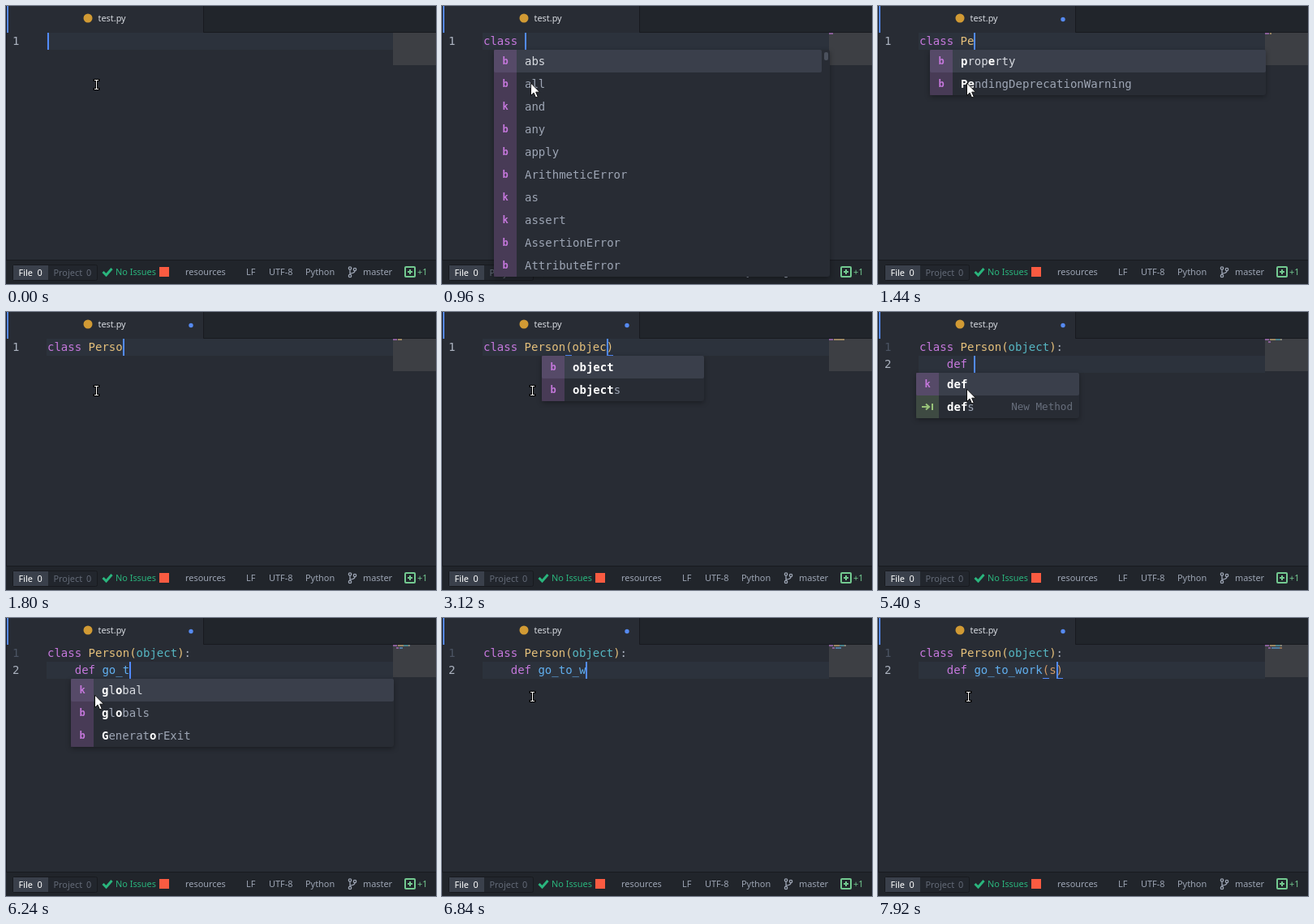
An HTML page that plays this animation: 530 by 343 pixels, repeating every 8 s.

```html
<!DOCTYPE html>
<html lang="en">
<head>
<meta charset="utf-8">
<title>Editor typing</title>
<style>
  html, body { margin: 0; width: 100%; height: 100%; overflow: hidden; background: #282c34; }
  svg { display: block; width: 530px; height: 343px; }
  text { white-space: pre; }
  .code { font: 14px "DejaVu Sans Mono", monospace; }
  .ui { font: 10.9px "Noto Sans", sans-serif; }
  .kind { font: bold 12px "DejaVu Sans Mono", monospace; text-anchor: middle; }
  .label { font: 12.6px "DejaVu Sans Mono", monospace; text-anchor: end; }
  .hit { font-weight: bold; fill: #fff; }
  .shadow { filter: drop-shadow(0 2px 3px rgba(0, 0, 0, .35)); }
</style>
</head>
<body>
<svg viewBox="0 0 530 343">
  <rect width="530" height="343" fill="#282c34"/>
  <rect x="243" width="287" height="33" fill="#21252b"/>
  <path d="M243.5 0V32.5H530" fill="none" stroke="#181a1f"/>
  <rect width="1" height="313" fill="#181a1f"/>
  <rect x="1" width="2" height="33" fill="#568af2"/>
  <circle cx="101" cy="15" r="5.5" fill="#d19a34"/>
  <text class="ui" x="113.5" y="19" fill="#d7dae0">test.py</text>

  <rect y="313" width="530" height="30" fill="#21252b"/>
  <rect y="313" width="530" height="1" fill="#181a1f"/>
  <rect x="8.5" y="319.5" width="104" height="19" rx="2" fill="#22262d" stroke="#181a1f"/>
  <rect x="9" y="320" width="43" height="18" fill="#3a404b"/>
  <path d="M119.5 328l4 4 7-8" fill="none" stroke="#2ab57d" stroke-width="3"/>
  <rect x="189" y="322" width="12" height="12" fill="#fa5b41"/>
  <g fill="none" stroke="#9da5b4" stroke-width="1.3">
    <circle cx="424" cy="323.5" r="1.7"/><circle cx="424" cy="333" r="1.7"/>
    <circle cx="430" cy="325" r="1.7"/>
    <path d="M424 325.2v6M430 326.7q0 3-6 3.3"/>
  </g>
  <g fill="none" stroke="#73c990" stroke-width="2">
    <rect x="492" y="322" width="12" height="12" rx="1"/>
    <path d="M495 328h6M498 325v6"/>
  </g>
  <g id="status"></g>
  <g id="scene"></g>
</svg>
<script>
const LOOP = 8000, CHAR = 8.428, LEFT = 51, TOP = 33, LINE = 21, ROW = 28;
const GREY = '#abb2bf', PURPLE = '#c678dd', YELLOW = '#e5c07b', BLUE = '#61afef',
      TEAL = '#56b6c2', ORANGE = '#d19a66', GREEN = '#98c379', CARET = '#528bff';

const rect = (x, y, w, h, fill, extra = '') =>
  `<rect x="${x}" y="${y}" width="${w}" height="${h}" fill="${fill}" ${extra}/>`;
const text = (cls, x, y, fill, body) =>
  `<text class="${cls}" x="${x}" y="${y}" fill="${fill}">${body}</text>`;
const columnX = col => Math.round(LEFT + col * CHAR);

const button = (x, countX, label, fill) =>
  text('ui', x, 333, fill, label) + text('ui', countX, 333, fill, 0);
document.getElementById('status').innerHTML =
  button(15.5, 38.5, 'File', '#fff') + button(58.5, 99, 'Project', '#636a77') + [
    [135, 'No Issues', '#2ab57d'], [221, 'resources'], [296, 'LF'], [324, 'UTF-8'],
    [369, 'Python'], [440, 'master'], [507, '+1', '#73c990']
  ].map(([x, label, fill = '#9da5b4']) => text('ui', x, 332, fill, label)).join('');

// Suggestions: kind (b builtin, k keyword, s snippet), word, optional label after "|".
const list = (col, prefix, width, ...items) => ({ col, prefix, width, items });
const builtins = ['b abs', 'b all', 'k and', 'b any', 'b apply', 'b ArithmeticError',
  'k as', 'k assert', 'b AssertionError', 'b AttributeError'];
const all1 = list(6, '', 414, ...builtins), all2 = list(8, '', 398, ...builtins);
const cl = list(0, 'cl', 240, 'k class', 'b classmethod', 'b callable', 'b compile', 'b complex');
const cla = list(0, 'cla', 240, 'k class', 'b classmethod', 'b callable');
const clas = list(0, 'clas', 240, 'k class', 'b classmethod');
const klass = { ...clas, prefix: 'class' };
const pe = list(6, 'pe', 414, 'b property', 'b PendingDeprecationWarning');
const per = { ...pe, prefix: 'per' };
const ob = list(13, 'ob', 200, 'b object', 'b objects');
const obj = { ...ob, prefix: 'object' };
const d = list(4, 'd', 260, 'k def', 'k del', 'b delattr', 'b DeprecationWarning', 'b dict',
  'b dir', 'b divmod', 'b dictview', 's defs|New Method');
const def = list(4, 'def', 201, 'k def', 's defs|New Method');
const go = list(8, 'go', 398, 'k global', 'b globals', 'b GeneratorExit');

// Each step: time, text with "|" as caret, open suggestions.
const head = 'class Person(object):\n    ';
const steps = [
  [0, '|'], [120, 'c|'], [240, 'cl|'], [360, 'cla|', cl], [480, 'clas|', cla],
  [600, 'class|', clas], [720, 'class|', klass], [960, 'class |', all1],
  [1080, 'class |', all1], [1200, 'class P|', all1], [1440, 'class Pe|', pe],
  [1560, 'class Per|', per], [1680, 'class Pers|', per], [1800, 'class Perso|'],
  [1920, 'class Person|'], [2280, 'class Person(|)'], [2520, 'class Person(o|)'],
  [2640, 'class Person(ob|)', ob], [2880, 'class Person(obj|)', obj],
  [3000, 'class Person(obje|)', obj], [3120, 'class Person(objec|)', obj],
  [3240, 'class Person(object|)', obj], [3360, 'class Person(object)|'],
  [3840, 'class Person(object):|'], [4080, head + '|'], [4560, head],
  [4920, head + 'd|'], [5040, head + 'de|', d], [5160, head + 'def|', d],
  [5280, head + 'def|', def], [5400, head + 'def |', def], [5640, head + 'def |', all2],
  [5760, head + 'def g|', all2], [5880, head + 'def go|', go], [6120, head + 'def go_|', go],
  [6240, head + 'def go_t|', go], [6360, head + 'def go_t|'], [6480, head + 'def go_to|'],
  [6720, head + 'def go_to_|'], [6840, head + 'def go_to_w|'], [6960, head + 'def go_to_wo|'],
  [7080, head + 'def go_to_wor|'], [7200, head + 'def go_to_work|'],
  [7560, head + 'def go_to_work(|)'], [7920, head + 'def go_to_work(s|)']
];

// Splits a line into [column, token, colour].
function tokens(line) {
  const isDef = /^\s*def\b/.test(line);
  return [...line.matchAll(/\w+|[^\w\s]/g)].map(({ 0: word, index }) => {
    let fill = GREY;
    if (word === 'class' || word === 'def') fill = PURPLE;
    else if (isDef) fill = line.lastIndexOf('(', index) >= 0 ? ORANGE : BLUE;
    else if (word === 'object') fill = TEAL;
    else if (line.startsWith('class') && word !== ':') fill = YELLOW;
    return [index, word, fill];
  });
}

function popup({ col, prefix, width, items }, lineCount) {
  const x = columnX(col) - 38, y = TOP + LINE * lineCount, height = items.length * ROW;
  const scrolls = items.length > 9;
  let out = rect(x, y, width, height, '#282c34', 'rx="3" class="shadow"');
  items.forEach((item, i) => {
    const kind = item[0], [word, label] = item.slice(2).split('|');
    const rowY = y + i * ROW, tint = kind === 's' ? GREEN : PURPLE;
    if (!i) out += rect(x, rowY, width - (scrolls ? 10 : 0), ROW, '#3a3f4b', 'rx="2"');
    out += rect(x, rowY, 28, ROW, tint, 'opacity=".2"');
    out += kind === 's'
      ? `<path d="M${x + 7} ${rowY + 14}h9m-4-3.5l4 3.5-4 3.5M${x + 20} ${rowY + 10}v8" fill="none" stroke="${tint}" stroke-width="2"/>`
      : text('kind', x + 14, rowY + 18, tint, kind);
    let at = 0;
    const body = [...word].map(c => {
      if (c.toLowerCase() !== prefix[at]) return c;
      at++;
      return `<tspan class="hit">${c}</tspan>`;
    }).join('');
    out += text('code', x + 38, rowY + 19, i ? '#9da5b4' : '#d7dae0', body);
    if (label) out += text('label', x + width - 8, rowY + 18, '#686f7d', label);
  });
  if (scrolls) out += rect(x + width - 7, y + 3, 5, 10, '#4b515d', 'rx="2"');
  const covers = x <= 111 && x + width > 111 && y + height > 97;
  return { out, covers };
}

const arrow = '<path d="M109.5 95v15.5l3.6-3.3 2.5 5.8 2.6-1.1-2.5-5.7h4.8z" fill="#fff" stroke="#111"/>';
const beamPath = 'M109 91.5h5M111.5 91.5v11M109 102.5h5';
const beam = `<path d="${beamPath}" fill="none" stroke="#000" stroke-width="3" stroke-linecap="square"/>
  <path d="${beamPath}" fill="none" stroke="#fff"/>`;

function draw([time, source, suggestions]) {
  const lines = source.split('\n'), last = lines.length - 1, lineY = TOP + last * LINE;
  const caret = lines[last].indexOf('|');
  const plain = lines.map(line => line.replace('|', ''));
  let out = rect(50, lineY, 427, LINE, '#2c323c') + rect(477, TOP, 53, 40, '#3d3f44');

  plain.forEach((line, i) => {
    const baseline = TOP + i * LINE + 15;
    out += text('code', 8, baseline, i === last ? GREY : '#4b5363', i + 1);
    for (const [col, word, fill] of tokens(line)) {
      out += text('code', LEFT + col * CHAR, baseline, fill, word);
      out += rect(477 + col, TOP + i * 3, word.length, 2, fill, 'opacity=".55"');
    }
  });

  const open = plain[last].indexOf('('), close = plain[last].indexOf(')');
  if (open >= 0 && caret >= open && caret <= close + 1) {
    for (const col of [open, close]) out += rect(columnX(col), lineY + 20, 8, 1, CARET);
  }
  if (caret >= 0) out += rect(columnX(caret), lineY, 2, LINE, CARET);
  if (time >= 1080) out += '<circle cx="228" cy="16.5" r="2.7" fill="#568af2"/>';

  const box = suggestions && popup(suggestions, lines.length);
  if (box) out += box.out;
  document.getElementById('scene').innerHTML = out + (box && box.covers ? arrow : beam);
}

const start = performance.now();
let shown;
function tick() {
  const time = (performance.now() - start) % LOOP;
  const step = steps.findLast(([from]) => from <= time);
  if (step !== shown) draw(shown = step);
  requestAnimationFrame(tick);
}
tick();
</script>
</body>
</html>
```
